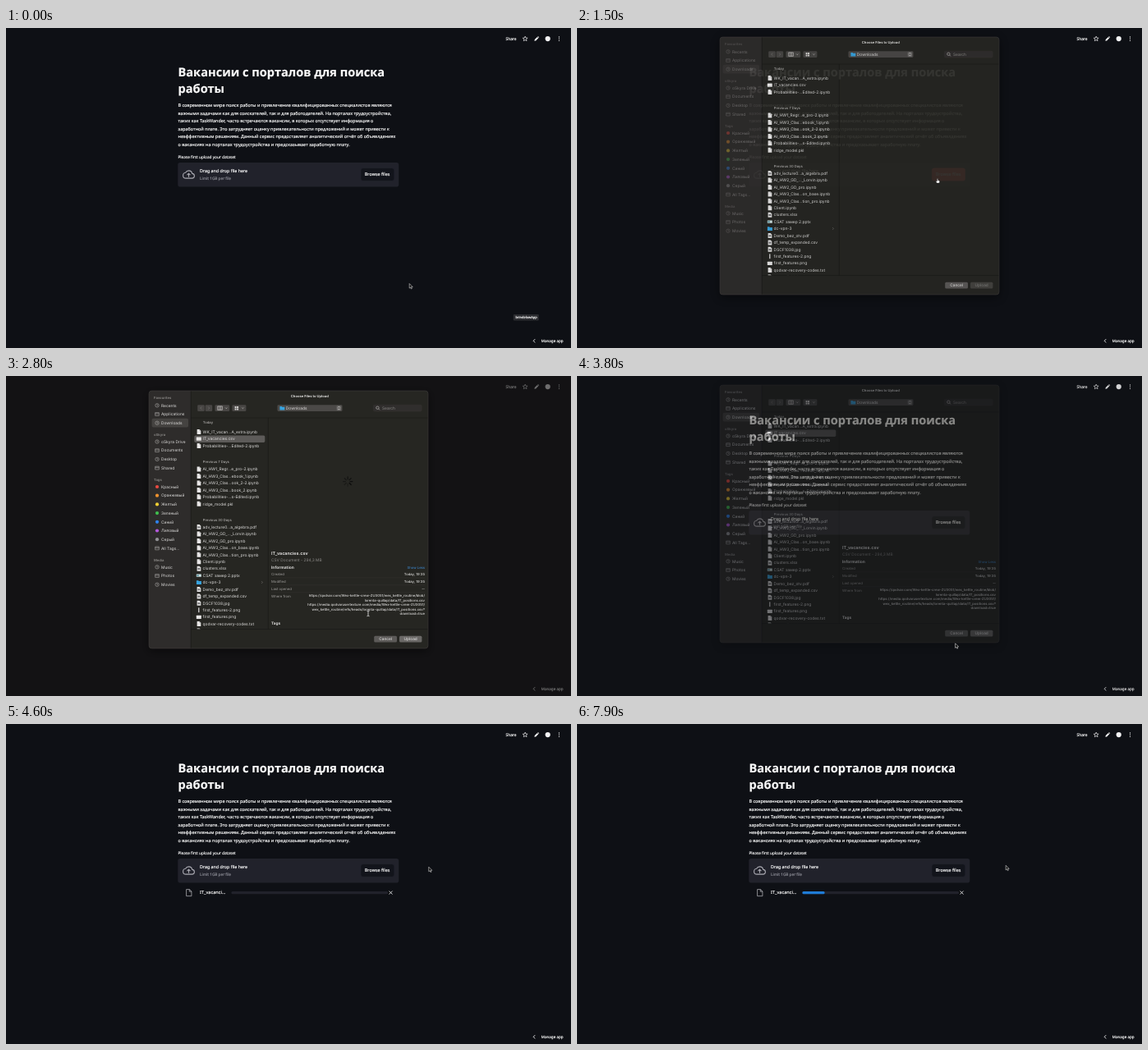
Recreate the animation shown at these times as an HTML page. Size 688 px wide and 390 px high, loop 8 s.

```html
<!DOCTYPE html>
<html lang="ru">
<head>
<meta charset="utf-8">
<title>Upload</title>
<style>
html, body { margin: 0; width: 100%; height: 100%; overflow: hidden; background: #0e1015; }
svg { display: block; width: 100vw; height: 100vh; text-rendering: geometricPrecision; }
.page text { font-family: "Noto Sans", "Open Sans", sans-serif; color: #fafafa; fill: currentColor; stroke: currentColor; stroke-width: .16px; }
.sheet text { font-family: Inter, "Liberation Sans", sans-serif; fill: #dddcdb; }
</style>
</head>
<body>
<svg id="stage" viewBox="0 0 688 390" xmlns="http://www.w3.org/2000/svg"></svg>
<script>
const LOOP = 8000, STEP = 100;

// Text is placed by its vertical centre.
const text = (x, cy, size, str, attrs = '') =>
  `<text x="${x}" y="${(cy + size * 0.355).toFixed(2)}" font-size="${size}" ${attrs}>${str}</text>`;
const rect = (x, y, w, h, fill, r = 0, attrs = '') =>
  `<rect x="${x}" y="${y}" width="${w}" height="${h}" rx="${r}" fill="${fill}" ${attrs}/>`;
const line = (d, color, width = 0.6, attrs = '') =>
  `<path d="${d}" fill="none" stroke="${color}" stroke-width="${width}" ${attrs}/>`;
const dot = (x, y, r, fill) => `<circle cx="${x}" cy="${y}" r="${r}" fill="${fill}"/>`;
const group = (id, body, attrs = '') => `<g id="${id}" ${attrs}>${body}</g>`;

const BOLD = 'font-weight="700"', SEMI = 'font-weight="600"', MID = 'font-weight="500"';
const GREY = 'style="fill:#8b8987"', END = 'text-anchor="end"';

// ---- Web page ----
function star(cx, cy, R) {
  const pts = [];
  for (let i = 0; i < 10; i++) {
    const a = i * Math.PI / 5 - Math.PI / 2, r = i % 2 ? R * 0.45 : R;
    pts.push((cx + r * Math.cos(a)).toFixed(2) + ',' + (cy + r * Math.sin(a)).toFixed(2));
  }
  return `<polygon points="${pts.join(' ')}" fill="none" stroke="#f4f4f5" stroke-width=".7" stroke-linejoin="round"/>`;
}

function topBar() {
  return text(608.5, 13, 4.85, 'Share') + star(632.2, 13.2, 3.1) +
    '<path d="M643.4 15.7l.4-1.7 3.1-3.1 1.4 1.4-3.1 3.1zM647.3 10.5l.6-.5 1.3 1.3-.5.6z" fill="#f4f4f5"/>' +
    dot(659.7, 13.1, 3.1, '#f4f4f5') +
    [10.9, 13.1, 15.3].map(y => dot(673.5, y, 0.65, '#f4f4f5')).join('') +
    line('M644.2 379.2l-2 2.1 2 2.1', '#f4f4f5', 0.9) + text(651.8, 381.3, 4.55, 'Manage app');
}

const intro = [
  'В современном мире поиск работы и привлечение квалифицированных специалистов являются',
  'важными задачами как для соискателей, так и для работодателей. На порталах трудоустройства,',
  'таких как TaskWander, часто встречаются вакансии, в которых отсутствует информация о',
  'заработной плате. Это затрудняет оценку привлекательности предложений и может привести к',
  'неэффективным решениям. Данный сервис предоставляет аналитический отчёт об объявлдениях',
  'о вакансиях на порталах трудоустройства и предсказывает заработную плату.'
];

function uploader() {
  const cloud = 'M19.35 10.04A7.49 7.49 0 0 0 12 4C9.11 4 6.6 5.64 5.35 8.04A6 6 0 0 0 0 14c0 3.31 2.69 6 6 6h13c2.76 0 5-2.24 5-5 0-2.64-2.05-4.78-4.65-4.96z';
  return rect(209.3, 164, 269, 29.6, '#21222b', 2.8) +
    `<g transform="translate(215.6 171.6) scale(.575)" fill="none" stroke="#aaaab2" stroke-width="1.9">
      <path d="${cloud}"/><path d="M12 17.5v-7M8.6 13.2L12 9.8l3.4 3.4"/></g>` +
    text(236, 174.4, 5.32, 'Drag and drop file here') +
    text(236, 183.8, 4.72, 'Limit 1GB per file', 'style="color:#8b8c95"') +
    rect(432.1, 170.8, 40.6, 15.4, '#12141b', 2.8, 'id="browse" stroke="#2a2b34" stroke-width=".35"') +
    text(436.8, 178.5, 5.45, 'Browse files');
}

function fileRow() {
  return line('M219.6 201.6h3.9l2.4 2.4v5.7h-6.3zM223.3 201.6v2.6h2.6', '#b4b4ba', 0.75) +
    text(236, 205, 5.6, 'IT_vacanci…') +
    rect(274.4, 204.1, 190.6, 3.1, '#21222b', 1.5) +
    rect(274.4, 204.1, 0, 3.1, '#1f7cd6', 1.5, 'id="bar"') +
    line('M466.6 203.6l3.9 3.9M470.5 203.6l-3.9 3.9', '#f4f4f5', 0.85);
}

function page() {
  return rect(0, 0, 688, 390, '#0e1015') + topBar() +
    text(209.5, 54.1, 14.6, 'Вакансии с порталов для поиска', BOLD) +
    text(209.5, 73.6, 14.6, 'работы', BOLD) +
    intro.map((s, i) => text(209.5, 94.3 + i * 9.52, 5.435, s)).join('') +
    text(209.5, 157.3, 4.73, 'Please first upload your dataset') +
    uploader() + group('row', fileRow()) +
    group('tip', rect(617.8, 349, 31, 7.6, '#2b2c30', 1) + text(620.4, 352.8, 4, 'brindelowApp'));
}

// ---- File dialog ----
const sections = [
  ['Favourites', 27, [['Recents', 35.8], ['Applications', 46.5], ['Downloads', 57.2]]],
  ['oSkyra', 72, [['oSkyra Drive', 80], ['Documents', 90.7], ['Desktop', 101.4], ['Shared', 112.1]]],
  ['Tags', 126.8, [['Красный', 135, '#ec4b42'], ['Оранжевый', 145.7, '#f0922e'], ['Желтый', 156.4, '#f2cf33'],
    ['Зеленый', 167.1, '#40c04f'], ['Синий', 177.8, '#2f83ee'], ['Лиловый', 188.5, '#b458dc'],
    ['Серый', 199.2, '#929296'], ['All Tags…', 209.9]]],
  ['Media', 224.4, [['Music', 232.8], ['Photos', 243.5], ['Movies', 254.2]]]
];

function sideIcon(y, i, color) {
  if (color) return dot(184, y, 2.1, color);
  return i % 2
    ? line(`M181.7 ${y - 1.9}h4.6v3.8h-4.6zM181.7 ${y - 0.5}h4.6`, '#b5b3b1', 0.55)
    : `<circle cx="184" cy="${y}" r="2.2" fill="none" stroke="#b5b3b1" stroke-width=".55"/>` +
      line(`M184 ${y - 1.3}v1.4h1.1`, '#b5b3b1', 0.5);
}

function sidebar() {
  return rect(177.6, 51.8, 44.4, 10.8, '#454341', 1.8) +
    sections.map(([name, y, items]) =>
      text(180, y, 4.2, name, SEMI + ' ' + GREY) +
      items.map(([label, cy, color], i) => sideIcon(cy, i, color) + text(189, cy, 4.88, label)).join('')
    ).join('');
}

// Icon kinds: d document, p preview page, w wide sheet, s slide, f folder, n narrow picture.
const files = [
  ['Today', 56.6, 68.1, ['d WK_IT_vacan…A_extra.ipynb', 'w IT_vacancies.csv', 'd Probabilities-…Edited-2.ipynb']],
  ['Previous 7 Days', 104.9, 113.6, ['d AI_HW1_Regr…e_pro-2.ipynb', 'd AI_HW3_Clas…ebook_1.ipynb',
    'd AI_HW3_Clas…ook_2-2.ipynb', 'd AI_HW3_Clas…book_2.ipynb', 'd Probabilities-…s-Edited.ipynb', 'd ridge_model.pkl']],
  ['Previous 30 Days', 175.4, 184.1, ['p adv_lecture0…a_algebra.pdf', 'd AI_HW2_GD_…_Lorvin.ipynb', 'd AI_HW2_GD_pro.ipynb',
    'd AI_HW3_Clas…on_base.ipynb', 'd AI_HW3_Clas…tion_pro.ipynb', 'd Client.ipynb', 'p clusters.xlsx',
    's CSAT замер 2.pptx', 'f dc-vpn-3', 'p Demo_bez_otv.pdf', 'p df_temp_expanded.csv', 'p DSCF1038.jpg',
    'n first_features-2.png', 'w first_features.png', 'd qodvar-recovery-codes.txt', 'd group_list.txt']]
];

function fileIcon(kind, y) {
  if (kind === 'w') return rect(231.8, y - 2, 6, 4.2, '#e8e7e6', 0.5);
  if (kind === 's') return rect(231.8, y - 1.6, 6, 3.2, '#cfe3e4', 0.3) + rect(232.3, y - 0.6, 2.4, 1.4, '#3d7f8c');
  if (kind === 'n') return rect(234.2, y - 2.9, 1.2, 5.8, '#e8e7e6');
  if (kind === 'f') return `<path d="M231.9 ${y - 2.2}h2.3l.7.7h3v4h-6z" fill="#37a4e0"/>`;
  return `<path d="M232.6 ${y - 3}h3l1.7 1.7v4.3h-4.7z" fill="#e8e7e6"/>` +
    (kind === 'p' ? rect(233.5, y - 0.8, 2.8, 2.2, '#77787a') : line(`M235.6 ${y - 3}v1.7h1.7`, '#8a8a8a', 0.4));
}

function fileList() {
  return files.map(([title, ty, top, names]) =>
    text(239.8, ty, 4.2, title, MID + ' style="fill:#b3b1af"') +
    names.map((s, i) => {
      const y = +(top + i * 8.43).toFixed(2);
      return fileIcon(s[0], y) + text(239.6, y, 4.92, s.slice(2));
    }).join('')
  ).join('') + line('M311.2 250.2l1.2 1.3-1.2 1.3', '#8b8987', 0.5);
}

const chevron = (x, y) => line(`M${x} ${y - 0.6}l1.2 1.2 1.2-1.2`, '#d0cecc', 0.6);

function toolbar() {
  return text(369.8, 24.4, 4.12, 'Choose Files to Upload', BOLD + ' text-anchor="middle"') +
    rect(233.2, 35.2, 8.6, 7.8, '#484644', 1.3) + rect(242.6, 35.2, 8.6, 7.8, '#484644', 1.3) +
    line('M238.2 37.5l-1.5 1.6 1.5 1.6M246.2 37.5l1.5 1.6-1.5 1.6', '#7d7b79') +
    rect(254.4, 35.2, 17.8, 7.8, '#484644', 1.3) + rect(275.4, 35.2, 17, 7.8, '#484644', 1.3) +
    line('M257.6 36.9h5.8v4.4h-5.8zM259.6 36.9v4.4M261.5 36.9v4.4', '#dddbd9') + chevron(267, 39.1) +
    [37, 39.5].map(y => [278.6, 281.1].map(x => rect(x, y, 1.9, 1.9, '#dddbd9', 0.3)).join('')).join('') + chevron(287.2, 39.1) +
    rect(330.5, 35.2, 79, 7.8, '#4b4947', 1.4) +
    '<path d="M333.4 37h2.2l.7.7h3v3.7h-5.9z" fill="#37a4e0"/>' + text(340.8, 39, 4.9, 'Downloads') +
    rect(402.6, 36.2, 5.6, 5.8, '#6b6967', 1.2) +
    line('M404.2 38.4l1.2-1.2 1.2 1.2M404.2 39.9l1.2 1.2 1.2-1.2', '#f2f1f0', 0.55) +
    rect(447.3, 35.2, 59, 7.8, '#302e2d', 1.4, 'stroke="#3d3b39" stroke-width=".3"') +
    '<circle cx="452.4" cy="38.7" r="1.7" fill="none" stroke="#c4c2c0" stroke-width=".6"/>' +
    line('M453.6 39.9l1.4 1.5', '#c4c2c0', 0.6) + text(458, 39.1, 4.8, 'Search', GREY);
}

const info = [['Created', 241.5, 'Today, 19:35'], ['Modified', 250.4, 'Today, 19:35'], ['Last opened', 259.3, '--'], ['Where from', 268, '']];
const origin = [
  'https://qodvar.com/Wex-kettle-crew-ZU3051/wex_kettle_routine/blob/',
  'lorenta-quillap/data/IT_positions.csv',
  'https://media.qodvarusertexture.com/media/Wex-kettle-crew-ZU3051/',
  'wex_kettle_routine/refs/heads/lorenta-quillap/data/IT_positions.csv?',
  'download=true'
];

function preview() {
  return text(323, 216, 5.35, 'IT_vacancies.csv', BOLD) +
    text(323, 224, 4.82, 'CSV Document - 294,3 MB', GREY) +
    text(323, 233, 4.9, 'Information', BOLD) +
    text(510, 233.2, 4.2, 'Show Less', END + ' style="fill:#3f8fdc"') +
    info.map(([k, y, v], i) => text(323, y, 4.25, k, 'style="fill:#a19f9d"') +
      text(510, y, 4.2, v, END + ' ' + MID) +
      (i < 3 ? line(`M323 ${y + 4.4}H510`, '#3a3836', 0.35) : '')).join('') +
    origin.map((s, i) => text(510, 268 + i * 5.37, 4.2, s, END + ' ' + MID)).join('') +
    text(323, 301.2, 4.7, 'Tags', BOLD);
}

function spinner() {
  let s = '';
  for (let i = 0; i < 8; i++)
    s += `<path d="M0 -2.8V-5.6" transform="rotate(${i * 45})" stroke="#0d0d0d" stroke-width="1.35" stroke-linecap="round" opacity="${0.35 + i * 0.09}"/>`;
  return s;
}

function sheet() {
  return rect(174, 18, 340, 314, '#272524', 3.5, 'filter="url(#shadow)"') +
    '<path d="M225 18H177.5a3.5 3.5 0 0 0-3.5 3.5V328.5a3.5 3.5 0 0 0 3.5 3.5H225z" fill="#2e2c2b"/>' +
    line('M225.2 18V332M319.3 51V308.6M225 51H514M225 308.6H514', '#191817', 0.6) +
    rect(174, 18, 340, 314, 'none', 3.5, 'stroke="#454341" stroke-width=".5"') +
    group('side', sidebar()) + toolbar() +
    rect(229.3, 72.5, 86, 8.4, '#5d5b59', 1.6, 'id="pick"') +
    group('files', fileList(), 'clip-path="url(#list)"') +
    group('info', preview()) + group('spin', spinner()) +
    rect(448.2, 316.7, 27.8, 7.8, '#5c5a58', 1.5) + text(462.1, 320.6, 4.75, 'Cancel', MID + ' text-anchor="middle"') +
    group('send', rect(479, 316.7, 27.4, 7.8, '#6a6866', 1.5) + text(492.7, 320.6, 4.75, 'Upload', MID + ' text-anchor="middle"'));
}

// ---- Pointers, hot spot at 0,0 ----
const pointers =
  group('arrow', '<path d="M0 0V5.6L1.3 4.5 2.2 6.4 3.1 6 2.3 4.1H4z" fill="#0a0a0a" stroke="#dcdcdc" stroke-width=".6" stroke-linejoin="round"/>') +
  group('hand', '<path d="M-.6 .3Q0 -.5 .6 .3V2L2.4 2.6Q2.9 3 2.5 4.3L2 5.5H-.8L-2 3.5Q-1.9 2.6-.6 3.2z" fill="#fff" stroke="#111" stroke-width=".4"/>') +
  group('beam', '<path d="M-1.5 -3.2Q-.2 -3.2 0 -2.5Q.2 -3.2 1.5 -3.2M0 -2.5V2.5M-1.5 3.2Q-.2 3.2 0 2.5Q.2 3.2 1.5 3.2" fill="none" stroke="#f0f0f0" stroke-width=".8"/>');

const stage = document.getElementById('stage');
stage.innerHTML =
  `<defs><filter id="shadow" x="-15%" y="-15%" width="130%" height="130%">
    <feDropShadow dx="0" dy="3" stdDeviation="6" flood-color="#000" flood-opacity=".5"/></filter>
    <clipPath id="list"><rect x="225" y="51" width="94" height="257.3"/></clipPath></defs>` +
  group('page', page(), 'class="page"') + rect(0, 0, 688, 390, '#161514', 0, 'id="dim"') +
  group('sheet', sheet(), 'class="sheet"') + group('pointer', pointers);

const el = {};
stage.querySelectorAll('[id]').forEach(n => el[n.id] = n);

// ---- Motion: [time, value...] keys, linear between them ----
function track(keys, t) {
  let i = 0;
  while (i < keys.length - 1 && keys[i + 1][0] <= t) i++;
  const a = keys[i], b = keys[i + 1];
  if (!b || t <= a[0]) return a.slice(1);
  const k = (t - a[0]) / (b[0] - a[0]);
  return a.slice(1).map((v, n) => v + (b[n + 1] - v) * k);
}

const path = [[0, 491.2, 311.5], [100, 490, 307], [500, 474, 255], [900, 452, 199], [1000, 447, 188], [1200, 444.3, 184.4],
  [1400, 444.3, 184.4], [1500, 439, 183.6], [1700, 420, 171], [2200, 240, 76], [2300, 237, 73], [2500, 342, 220],
  [2600, 342, 220], [2800, 441, 289.5], [3200, 495, 319], [3500, 495, 319], [3700, 478, 324], [4000, 425.8, 329.5],
  [4400, 500, 178], [4700, 522.2, 172.3]];
const sheetKeys = [[1500, 0.93, -7], [1600, 1, 0], [3500, 1, 0], [3600, 0.88, -2], [3800, 0.45, -7], [4000, 0.17, -11.3], [4200, 0, -13]];
const dimKeys = [[1500, 0], [1800, 0.6], [3500, 0.6], [3900, 0]];
const barKeys = [[4800, 0], [5100, 1.6], [5400, 1.9], [5800, 5.2], [6300, 11.4], [7200, 17.9], [7900, 27.2]];

const show = (node, on) => node.setAttribute('display', on ? 'inline' : 'none');
const fade = (node, v) => node.setAttribute('opacity', v);

function draw(t) {
  const [x, y] = track(path, t);
  el.pointer.setAttribute('transform', `translate(${x} ${y})`);
  const hand = t >= 1000 && t < 1600, beam = t >= 2700 && t < 3000;
  show(el.hand, hand);
  show(el.beam, beam);
  show(el.arrow, !hand && !beam);

  const hover = t >= 1000 && t < 1800;
  el.browse.setAttribute('fill', hover ? '#ff4448' : '#12141b');
  el.browse.setAttribute('stroke', hover ? '#ff4448' : '#2a2b34');
  fade(el.tip, track([[0, 1], [400, 0]], t)[0]);

  const [alpha, dy] = track(sheetKeys, t);
  show(el.sheet, t >= 1500 && t < 4200);
  fade(el.sheet, alpha);
  el.sheet.setAttribute('transform', `translate(0 ${dy})`);
  fade(el.dim, track(dimKeys, t)[0]);
  fade(el.side, track([[1500, 0.38], [1800, 1]], t)[0]);
  const picked = t >= 2300;
  show(el.pick, picked);
  show(el.info, picked);
  fade(el.send, picked ? 1 : 0.45);
  show(el.spin, t >= 2700);
  el.spin.setAttribute('transform', `translate(416.2 128.6) rotate(${Math.floor(t / 100) * 45})`);

  show(el.row, t >= 4300);
  el.bar.setAttribute('width', track(barKeys, t)[0]);
}

function tick(now) {
  draw(Math.floor(now % LOOP / STEP) * STEP);
  requestAnimationFrame(tick);
}
draw(0);
requestAnimationFrame(tick);
</script>
</body>
</html>
```
